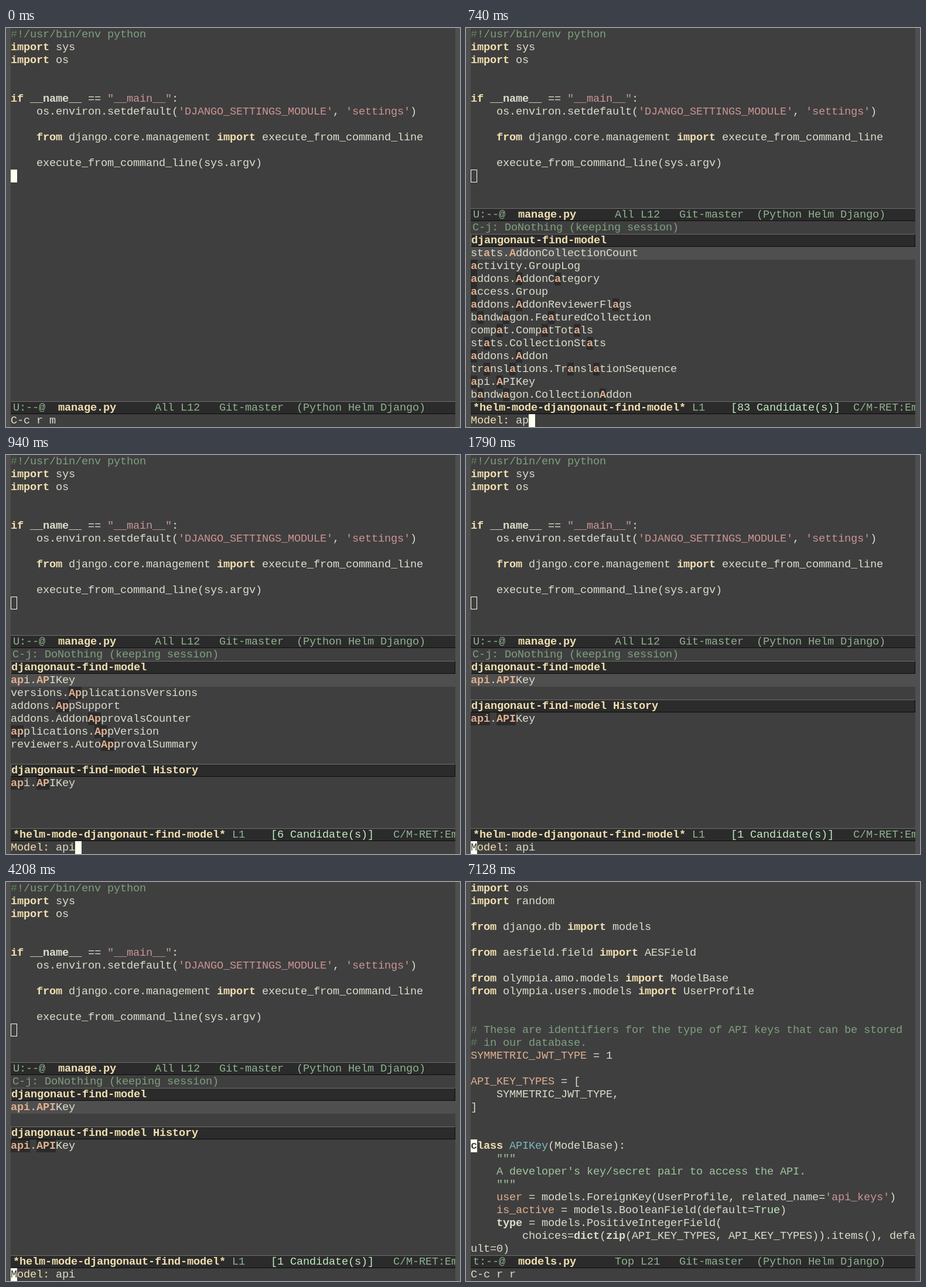
Animation, 775 px wide and 682 px high, one loop 8 s. Source, as an HTML page:

```html
<!DOCTYPE html>
<html lang="en">
<head>
<meta charset="utf-8">
<title>Find model</title>
<style>
html, body { margin: 0; width: 100%; height: 100%; overflow: hidden; background: #3f3f3f; }
#stage {
  position: relative; width: 775px; height: 682px; overflow: hidden;
  box-sizing: border-box; border: solid #4f4f4f; border-width: 0 8px;
  color: #dcdccc; font: 18.667px/22px "Liberation Mono", monospace;
  letter-spacing: calc(11px - 1ch); white-space: pre;
}
#stage div { position: absolute; left: 0; width: 759px; height: 22px; }
#stage .wide { left: -8px; width: 775px; }
#stage .bar {
  box-sizing: border-box; overflow: hidden; line-height: 20px;
  background: #2b2b2b; color: #8fb28f;
  border: 1px solid; border-color: #6e6e6e #0b0b0b #0b0b0b #6e6e6e;
}
.help { background: #3f3f3f; color: #7f9f7f; }
.pick { background: #4f4f4f; }
i { font-style: normal; }
.k { color: #f0dfaf; font-weight: bold; }
.p { color: #f0dfaf; }
.b { font-weight: bold; }
.s { color: #cc9393; }
.c { color: #7f9f7f; }
.h { color: #5f7f5f; }
.v { color: #dfaf8f; }
.t { color: #7cb8bb; }
.d { color: #9fc59f; }
.n { color: #bfebbf; }
.m { color: #dfaf8f; font-weight: bold; background: #2b2b2b; }
.pick .m { background: none; }
.x { color: #3f3f3f; background: #ffffef; }
.o { box-shadow: inset 0 0 0 1px #ffffef; }
svg { position: absolute; fill: #dcdccc; }
</style>
</head>
<body>
<div id="stage"></div>
<script>
// {k:text} marks a span of class k
const paint = s => s.replace(/\{(\w):([^}]*)\}/g, '<i class="$1">$2</i>');
const line = (row, text, cls = '') =>
  `<div class="${cls}" style="top:${row * 22}px">${paint(text)}</div>`;
const lines = (row, list) => list.map((s, i) => line(row + i, s)).join('');

const manage = `{h:#}{c:!/usr/bin/env python}
{k:import} sys
{k:import} os


{k:if} {b:__name__} == {s:"__main__"}:
    os.environ.setdefault({s:'DJANGO_SETTINGS_MODULE'}, {s:'settings'})

    {k:from} django.core.management {k:import} execute_from_command_line

    execute_from_command_line(sys.argv)`.split('\n');

const models = `{k:import} os
{k:import} random

{k:from} django.db {k:import} models

{k:from} aesfield.field {k:import} AESField

{k:from} olympia.amo.models {k:import} ModelBase
{k:from} olympia.users.models {k:import} UserProfile


{h:# }{c:These are identifiers for the type of API keys that can be stored}
{h:# }{c:in our database.}
{v:SYMMETRIC_JWT_TYPE} = 1

{v:API_KEY_TYPES} = [
    SYMMETRIC_JWT_TYPE,
]


{b:{x:c}{k:lass} {t:APIKey}(ModelBase):
    {d:"""}
    {d:A developer's key/secret pair to access the API.}
    {d:"""}
    {v:user} = models.ForeignKey(UserProfile, related_name={s:'api_keys'})
    {v:is_active} = models.BooleanField(default={n:True})
    {b:type} = models.PositiveIntegerField(
        choices={b:dict}({b:zip}(API_KEY_TYPES, API_KEY_TYPES)).items(), defa
ult=0)`.replace('{b:{x:c}', '<b>{x:c}</b>').split('\n');

const all = `stats.AddonCollectionCount activity.GroupLog addons.AddonCategory access.Group
addons.AddonReviewerFlags bandwagon.FeaturedCollection compat.CompatTotals stats.CollectionStats
addons.Addon translations.TranslationSequence api.APIKey bandwagon.CollectionAddon`.split(/\s/);
const some = `api.APIKey versions.ApplicationsVersions addons.AppSupport
addons.AddonApprovalsCounter applications.AppVersion reviewers.AutoApprovalSummary`.split(/\s/);
const one = ['api.APIKey'];

const bar = (row, text) => line(row, text, 'wide bar');
const status = (row, flag, file, gap, place) =>
  bar(row, ` ${flag}:--@  {k:${file}}${' '.repeat(gap)}${place}   Git-master  (Python Helm Django)`);
const heading = (row, text) => line(row, `{k:${text}}`, 'bar');

function editor(code, flag, file, gap, place, echo) {
  return lines(0, code) + status(29, flag, file, gap, place) + line(30, echo);
}

function search(items, match, count, prompt, history) {
  const mark = s => match ? s.replace(RegExp(match, 'gi'), '{m:$&}') : s;
  const found = items.map(mark);
  const end = 18 + items.length;
  const title = 'djangonaut-find-model';
  return lines(0, manage) + line(11, '{o: }') +
    status(14, 'U', 'manage.py', 6, 'All L12') +
    line(15, ' C-j: DoNothing (keeping session)', 'wide help') +
    heading(16, title) + line(17, found[0], 'pick') + lines(18, found.slice(1)) +
    (history ? heading(end, title + ' History') + line(end + 1, mark(one[0])) : '') +
    bar(29, ` {k:*helm-mode-${title}*} L1    {n:[${count} Candidate(s)]}` +
      ' '.repeat(4 - String(count).length) + 'C/M-RET:Emp') +
    line(30, prompt);
}

const curl = (x, y, flip) => `<svg width="8" height="8" style="left:${x}px;top:${y}px">
<path ${flip ? 'transform="matrix(-1 0 0 1 8 0)"' : ''} shape-rendering="crispEdges"
d="M2 0h4v1h1v1h1v3h-1v1h-1v1h1v1H2V3h1v1h2V3h1V2H2z"/></svg>`;

const scenes = [
  [0, editor(manage, 'U', 'manage.py', 6, 'All L12', 'C-c r m') + line(11, '{x: }')],
  [500, search(all, '', 100, '{p:Model: }a{x: }')],
  [740, search(all, 'a', 83, '{p:Model: }ap{x: }')],
  [940, search(some, 'ap', 6, '{p:Model: }api{x: }', true)],
  [1790, search(one, 'api', 1, '{x:M}{p:odel: }api', true)],
  [5820, editor(models, 't', 'models.py', 6, 'Top L21', 'C-c r r') +
    curl(759, 601) + curl(-8, 623, true)]
];

const stage = document.getElementById('stage');
const start = performance.now();
let shown;
function tick() {
  const t = (performance.now() - start) % 8000;
  const scene = scenes.filter(s => s[0] <= t).pop();
  if (scene !== shown) stage.innerHTML = (shown = scene)[1];
  requestAnimationFrame(tick);
}
tick();
</script>
</body>
</html>
```
